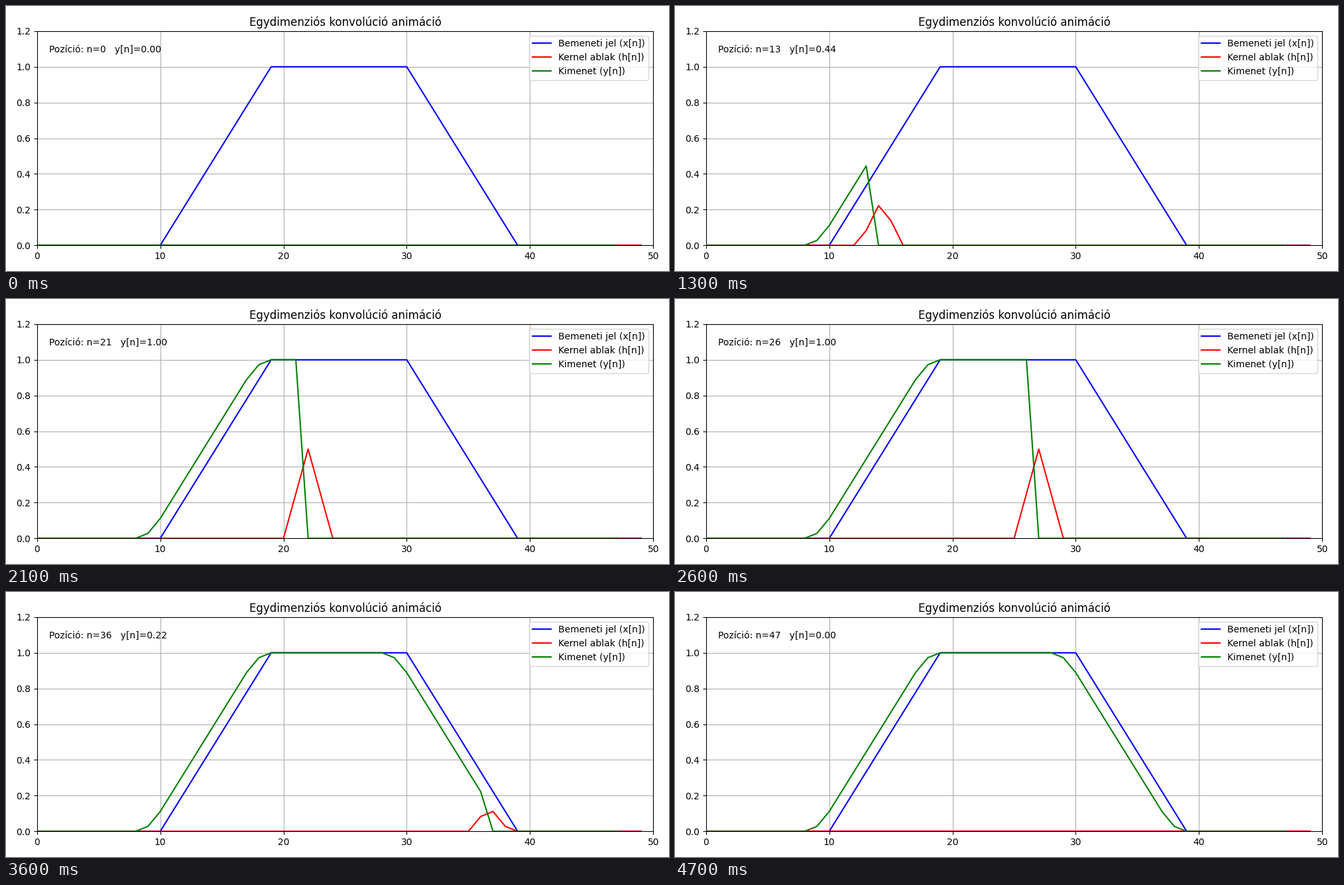
Animation, 1000 px wide and 400 px high, one loop 4800 ms. Source, as a matplotlib script:

```python
import numpy as np
import matplotlib.pyplot as plt
from matplotlib.animation import FuncAnimation

plt.rcParams["font.family"] = "DejaVu Sans"

# Trapezoid signal and a small smoothing kernel
N = 50
x = np.zeros(N)
x[10:20] = np.linspace(0, 1, 10)
x[20:30] = 1
x[30:40] = np.linspace(1, 0, 10)
h = np.array([0.25, 0.5, 0.25])
K = len(h)
STEPS = N - K + 1
y = np.array([np.sum(x[n:n + K] * h) for n in range(STEPS)])

fig, ax = plt.subplots(figsize=(10, 4), dpi=100)
ax.plot(np.arange(N), x, color="blue", label="Bemeneti jel (x[n])")
window_line, = ax.plot(np.arange(N), np.zeros(N), color="red",
                       label="Kernel ablak (h[n])")
out_line, = ax.plot(np.arange(STEPS), np.zeros(STEPS), color="green",
                    label="Kimenet (y[n])")
info = ax.text(1, 1.08, "")

ax.set_xlim(0, N)
ax.set_ylim(0, 1.2)
ax.set_title("Egydimenziós konvolúció animáció")
ax.grid(True)
ax.legend(loc="upper right")
fig.tight_layout()


def update(n):
    window = np.zeros(N)
    window[n:n + K] = x[n:n + K] * h
    window_line.set_ydata(window)
    out_line.set_ydata(np.where(np.arange(STEPS) <= n, y, 0))
    info.set_text(f"Pozíció: n={n}   y[n]={y[n]:.2f}")
    return window_line, out_line, info


anim = FuncAnimation(fig, update, frames=STEPS, interval=100,
                     init_func=lambda: update(0), repeat=True, repeat_delay=0)
plt.show()
```
